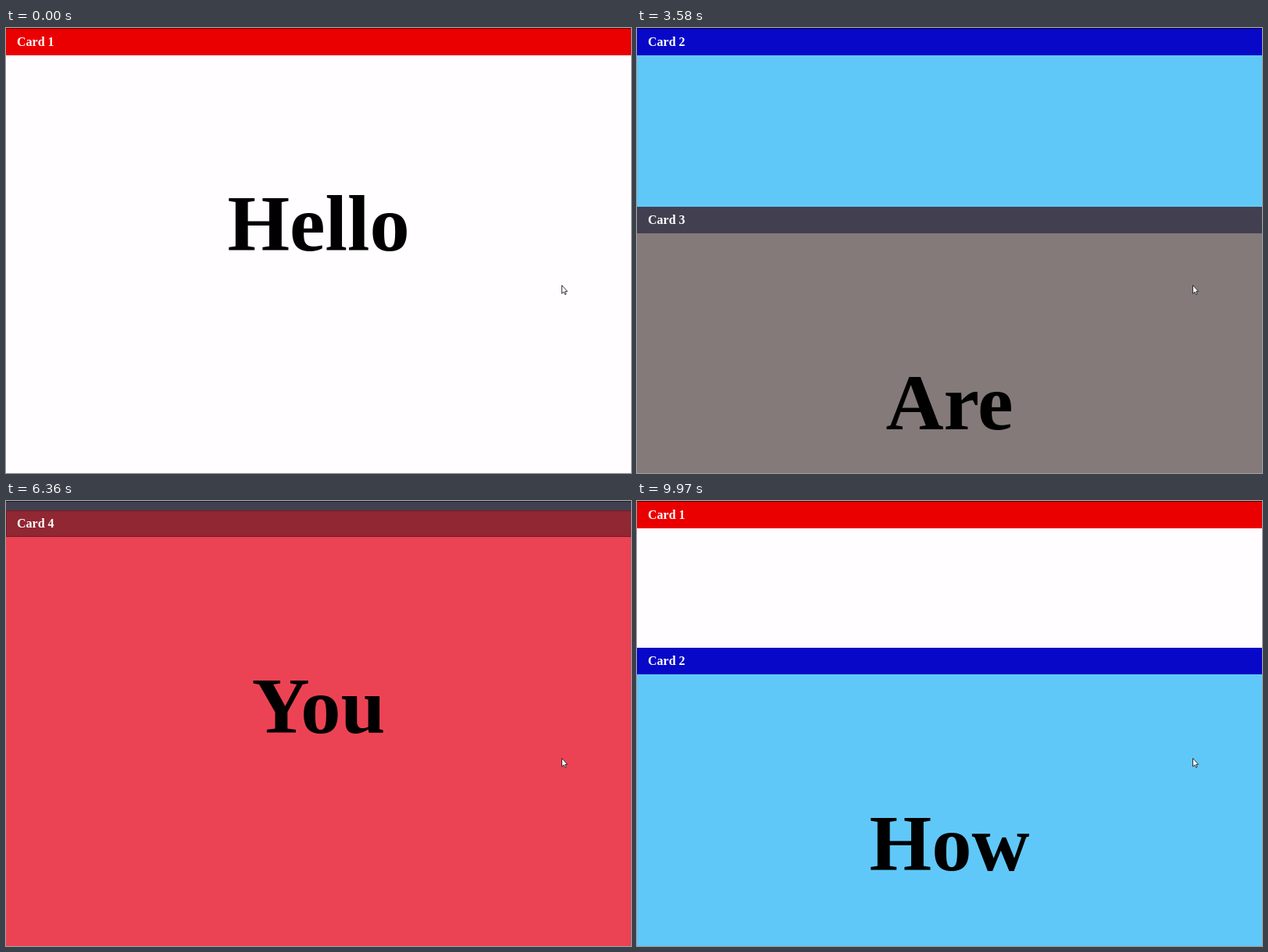
Recreate the animation shown at these times as an HTML page with a canvas. Size 800 px wide and 570 px high, loop 10 s.

```html
<!DOCTYPE html>
<html lang="en">
<head>
<meta charset="utf-8">
<title>Sticky card headers</title>
<style>
  html, body { margin: 0; width: 100%; height: 100%; overflow: hidden; background: #fffdff; }
  canvas { display: block; }
</style>
</head>
<body>
<canvas id="stage" width="800" height="570"></canvas>
<script>
const WIDTH = 800, HEIGHT = 570, LOOP = 10000;
const CARD_HEIGHT = 623, HEADER_HEIGHT = 34, STICKY_TOP = 1;
const FONT = '"Liberation Serif", "Times New Roman", serif';

const cards = [
  { word: 'Hello', header: '#ea0000', body: '#fffdff' },
  { word: 'How', header: '#0808c8', body: '#60c8f8' },
  { word: 'Are', header: '#424050', body: '#847a7a' },
  { word: 'You', header: '#902733', body: '#ec4354', border: '#741a26' }
];

// [time in ms, scroll offset in px]
const scrollKeys = [
  [0, 0], [1360, 323], [2060, 590], [3580, 1017], [4150, 1217],
  [5240, 1464], [6210, 1816], [6730, 1922], [6880, 1922],
  [7670, 1458], [8580, 993], [9940, 462], [9970, 435], [LOOP, 435]
];

const ctx = document.getElementById('stage').getContext('2d');

function slope(i) {
  const [t0, s0] = scrollKeys[i], [t1, s1] = scrollKeys[i + 1];
  return (s1 - s0) / (t1 - t0);
}

// Harmonic mean keeps the curve monotone between keys.
function tangent(i) {
  if (i === 0) return slope(0) / 2;
  if (i === scrollKeys.length - 1) return 0;
  const a = slope(i - 1), b = slope(i);
  return a * b <= 0 ? 0 : 2 * a * b / (a + b);
}

function scrollAt(time) {
  let i = 0;
  while (time >= scrollKeys[i + 1][0]) i++;
  const [t0, s0] = scrollKeys[i], [t1, s1] = scrollKeys[i + 1];
  const span = t1 - t0, u = (time - t0) / span, v = 1 - u;
  return v * v * (1 + 2 * u) * s0 + u * u * (3 - 2 * u) * s1
    + span * u * v * (v * tangent(i) - u * tangent(i + 1));
}

function fillBox(color, x, y, w, h) {
  ctx.fillStyle = color;
  ctx.fillRect(x, y, w, h);
}

function drawText(text, size, color, align, x, baseline) {
  ctx.font = `bold ${size}px ${FONT}`;
  ctx.fillStyle = color;
  ctx.textAlign = align;
  ctx.fillText(text, x, baseline);
}

function drawCard(card, index, scroll) {
  const top = Math.round(index * CARD_HEIGHT - scroll);
  const bottom = top + CARD_HEIGHT;
  if (top >= HEIGHT || bottom <= 0) return;

  fillBox(card.body, 0, top, WIDTH, CARD_HEIGHT);
  drawText(card.word, 102.4, '#000', 'center', 400, top + 285);

  // The header sticks to the top until the end of its card pushes it out.
  const y = Math.min(Math.max(top, STICKY_TOP), bottom - HEADER_HEIGHT);
  fillBox(card.header, 0, y, WIDTH, HEADER_HEIGHT);
  if (y === STICKY_TOP) fillBox(card.header, 0, 0, WIDTH, STICKY_TOP);
  if (card.border) {
    ctx.strokeStyle = card.border;
    ctx.lineWidth = 1;
    ctx.strokeRect(0.5, y + 0.5, WIDTH, HEADER_HEIGHT - 1);
  }
  drawText(`Card ${index + 1}`, 16, '#fff', 'left', 14, y + 22);
}

const pointer = new Path2D(
  'M711.5 329.5V340.2L714 338L715.5 341.5L717 340.9L715.6 337.4H718.6Z');

function drawPointer() {
  ctx.fillStyle = '#fff';
  ctx.fill(pointer);
  ctx.strokeStyle = '#222';
  ctx.lineWidth = 0.9;
  ctx.stroke(pointer);
}

function draw(now) {
  const scroll = scrollAt(now % LOOP);
  cards.forEach((card, index) => drawCard(card, index, scroll));
  fillBox('rgba(0, 0, 0, 0.6)', 0, 0, WIDTH, 1);
  drawPointer();
}

const start = performance.now();
function tick() {
  draw(performance.now() - start);
  requestAnimationFrame(tick);
}
tick();
</script>
</body>
</html>
```
